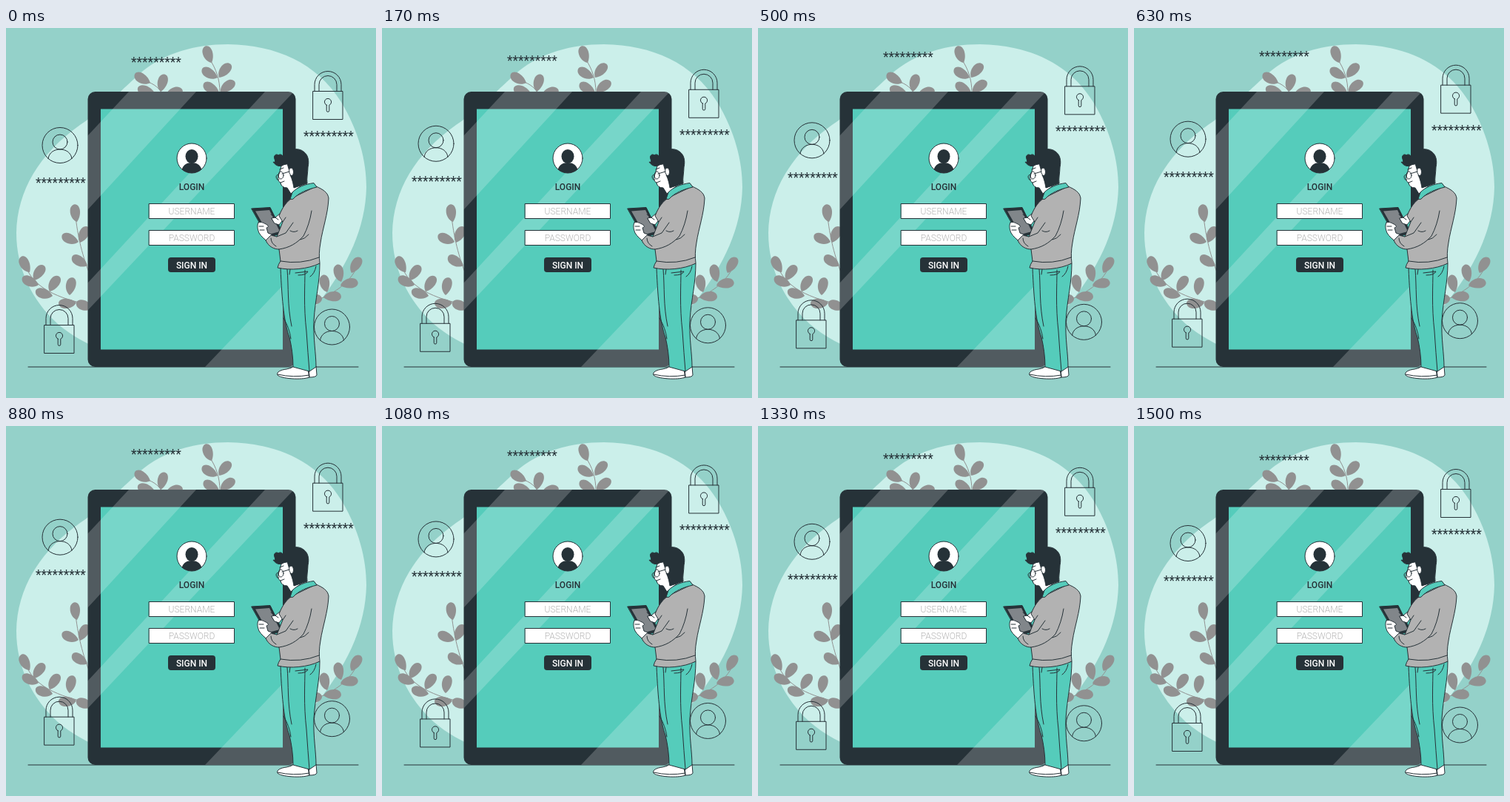
An HTML page for the animation above (1.54 s loop, 500 by 500 pixels).

```html
<!DOCTYPE html>
<html lang="en">
<head>
<meta charset="utf-8">
<title>Login</title>
<style>
  html, body { margin: 0; width: 100%; height: 100%; overflow: hidden; background: #94d1c9; }
  svg { display: block; width: 100vw; height: 100vh; }
  .line { fill: none; stroke: #263238; stroke-linecap: round; stroke-linejoin: round; }
  .teal { fill: #55ccbb; }
  .white { fill: #fff; }
  .dark { fill: #263238; }
  .sweater { fill: #b2b2b2; }
  .stars { font: 17.5px Roboto, sans-serif; fill: #263238; }
  .label { font: 500 12px Roboto, "Open Sans", sans-serif; font-stretch: 75%; text-anchor: middle; }
  .hint { font-weight: 300; fill: #b5b5b5; }
</style>
</head>
<body>
<svg viewBox="0 0 500 500">
  <defs>
    <path id="leaf" d="M0 0C-5-3-8-10-6.5-17C-5.5-22-2-24 1-24C5-23.500 7-19 6.500-14C6-8 3-3 0 0Z"/>
    <g id="lock" class="line">
      <path d="M-20 0H20V38H-20ZM-18 0V-9A18 18 0 0 1 18-9V0M-12 0V-9A12 12 0 0 1 12-9V0"/>
      <path d="M-1.800 18.700V26a1.800 1.800 0 0 0 3.600 0V18.700A4.600 4.600 0 1 0-1.800 18.700Z"/>
    </g>
    <g id="user" class="line">
      <circle r="24"/>
      <circle cy="-4.500" r="10"/>
      <path d="M-16 18C-15 10-8 5.500 0 5.500S15 10 16 18"/>
    </g>
    <clipPath id="tabletShape"><rect x="110.500" y="86" width="281" height="372" rx="10"/></clipPath>
    <clipPath id="avatarShape"><circle cx="251" cy="176" r="20"/></clipPath>
  </defs>

  <path fill="#cbefea" d="M300 22C365 23 420 47 453 100C477 140 487 180 487 215C486 270 462 320 425 368C380 425 300 452 220 452C160 452 105 430 70 400C35 368 14 325 14 277C15 220 45 170 100 131C135 108 155 84 185 58C215 34 255 22 300 22Z"/>
  <g id="plants" fill="#919191"></g>
  <path class="line" d="M30 458H476"/>

  <g id="floating">
    <text class="stars" x="169" y="52">*********</text>
    <text class="stars" x="402" y="152">*********</text>
    <text class="stars" x="40" y="215">*********</text>
    <use href="#lock" x="435" y="85.500"/>
    <use href="#lock" x="72" y="401.500"/>
    <use href="#user" x="73" y="158.500"/>
    <use href="#user" x="440.500" y="404"/>
  </g>

  <g clip-path="url(#tabletShape)">
    <path class="dark" d="M110 86H392V458H110Z"/>
    <path class="teal" d="M128 109.500H374V434.500H128Z"/>
    <path fill="#fff" fill-opacity=".2" d="M166 86H257L110 246V146ZM350 86H389L110 382V345ZM269 458H392V329Z"/>
  </g>
  <circle class="white" cx="251" cy="176" r="20"/>
  <g class="dark" clip-path="url(#avatarShape)">
    <ellipse cx="251" cy="173.500" rx="8.500" ry="9.500"/>
    <path d="M237 197C237 187 242 182 251 182S265 187 265 197Z"/>
  </g>
  <circle class="line" cx="251" cy="176" r="20"/>
  <text class="label dark" x="251" y="218.500">LOGIN</text>
  <path class="line" style="fill:#fff" d="M193.500 237.500H308.500V257.500H193.500ZM193.500 273.500H308.500V293.500H193.500Z"/>
  <text class="label hint" x="251" y="252">USERNAME</text>
  <text class="label hint" x="251" y="288">PASSWORD</text>
  <rect class="dark" x="219" y="310" width="64" height="20" rx="4"/>
  <text class="label white" x="251" y="324.500">SIGN IN</text>

  <g stroke="#263238" stroke-linejoin="round" stroke-linecap="round">
    <!-- shoes and trousers -->
    <path class="white" d="M408 457H419L420 469Q419 472 410 472ZM389 457L409 459L410 472C400 476 371 474 367 469C365 465 371 462 379 461Q386 460 389 457Z"/>
    <path class="line" d="M367 468Q388 473 410 469"/>
    <path class="teal" d="M371 324L424 318C424 345 418 365 416 395C415 420 419 440 419 458L410 464L388 458C388 445 386 430 383 418C376 398 373 372 371 324Z"/>
    <path class="line" d="M404 327C404 350 402 375 406 410Q408 440 410 464M380 326C382 350 380 375 386 403M391 331L408 329Q406 334 395 334M384 326L383 333M375 392Q383 405 385 420M419 322Q417 332 411 336"/>

    <!-- face, hair and glasses -->
    <path class="white" d="M374 181C371 187 371 193 368 200C367 204 368 208 371 209Q372 216 380 216L385 224L400 212L402 199L386 183Z"/>
    <path class="dark" d="M375 185C371 188 365 187 361 181C364 182 364 180 363 177C361 173 365 169 368 172C370 170 373 171 374 173C380 163 395 161 402 167C408 171 410 179 408 188C408 195 406 203 407 210L389 216C388 209 386 202 384 199L386 194C381 193 382 187 380 184Z"/>
    <path class="white" d="M386 200C382 197 381 190 385 189C389 189 390 198 386 200Z"/>
    <path class="line" d="M373 197L383 194M370 191L375 189M371 209L376 207"/>
    <ellipse class="line" cx="371.500" cy="199" rx="3.500" ry="5"/>
    <path class="line" d="M368 199Q366 197 365 201Q366 207 369 205"/>

    <!-- hand-held device -->
    <path class="dark" d="M332 244L357 242.500L374 277L354 283Z"/>
    <path fill="#81868a" stroke="none" d="M337 247.500L356 246L370 275L355 279Z"/>
    <path class="white" d="M341 263C345 261 349 264 353 266Q356 269 352 270L354 277Q358 278 361 281L355 290C350 286 345 282 342 277C340 272 339 267 341 263Z"/>
    <path class="line" d="M342 268L348 268M343 273L349 273"/>
    <path class="white" d="M359 257L364 256L371 250L376 257L369 266L363 264Z"/>
    <path class="line" d="M358 252L368 259"/>

    <!-- sweater and collar -->
    <path class="sweater" d="M388 229L419 214C428 218 435 222 436 230C435 252 428 270 425 290C423 301 423 309 424 318C408 326 384 328 367 324Q368 319 371 315L369 299C363 299 355 296 351 287L358 280L366 282L374 262L369 254C373 243 380 233 388 229Z"/>
    <path class="teal" d="M384 231L387 222C394 215 404 211 416 209.500L420 215C408 218 396 222 388 231Z"/>
    <path class="line" d="M371 315Q398 320 423 310M369 299C383 297 393 291 402 281Q410 266 413 247M366 282L378 277L388 263M384 274Q389 277 394 274M374 262L378 256M358 284Q358 291 365 295M398 286Q404 285 409 279"/>
  </g>
</svg>
<script>
  // Each leaf: base x, base y, angle clockwise from upright.
  const plants = [
    ["M289 87C289 70 284 55 275 42",
      [[278,47,-22], [286,67,-62], [288,67,38], [288,87,-62], [290,87,50]]],
    ["M189 72C200 75 208 82 212 90",
      [[195,74,-62], [209,86,12], [201,88,-75], [216,92,68]]],
    ["M94 255C98 290 106 315 114 335",
      [[96,262,-10], [98,289,-70], [100,290,25], [110,321,-60]]],
    ["M27 322C36 350 70 366 114 374",
      [[32,330,-30], [38,341,32], [44,347,-68], [59,356,30], [63,362,-75], [86,361,8], [95,371,-95], [118,378,-75]]],
    ["M408 372C440 362 468 345 478 314",
      [[467,331,28], [453,343,-14], [452,348,78], [434,357,-14], [429,364,85], [404,372,70]]]
  ];
  document.getElementById("plants").innerHTML = plants.map(([stem, leaves]) =>
    `<path d="${stem}" fill="none" stroke="#919191"/>` + leaves.map(([x, y, angle]) =>
      `<use href="#leaf" transform="translate(${x} ${y}) rotate(${angle})"/>`).join("")
  ).join("");

  const LOOP = 1540, FPS = 24, STEPS = 36, RISE = 10;
  const floating = document.getElementById("floating");

  // Linear rise and fall in 24 fps steps, with one resting step at the end.
  function draw(now) {
    const step = Math.min(STEPS, Math.floor((now % LOOP + 5) * FPS / 1000));
    const lift = RISE * (1 - Math.abs(2 * step / STEPS - 1));
    floating.setAttribute("transform", `translate(0 ${-lift})`);
    requestAnimationFrame(draw);
  }
  draw(performance.now());
</script>
</body>
</html>
```
